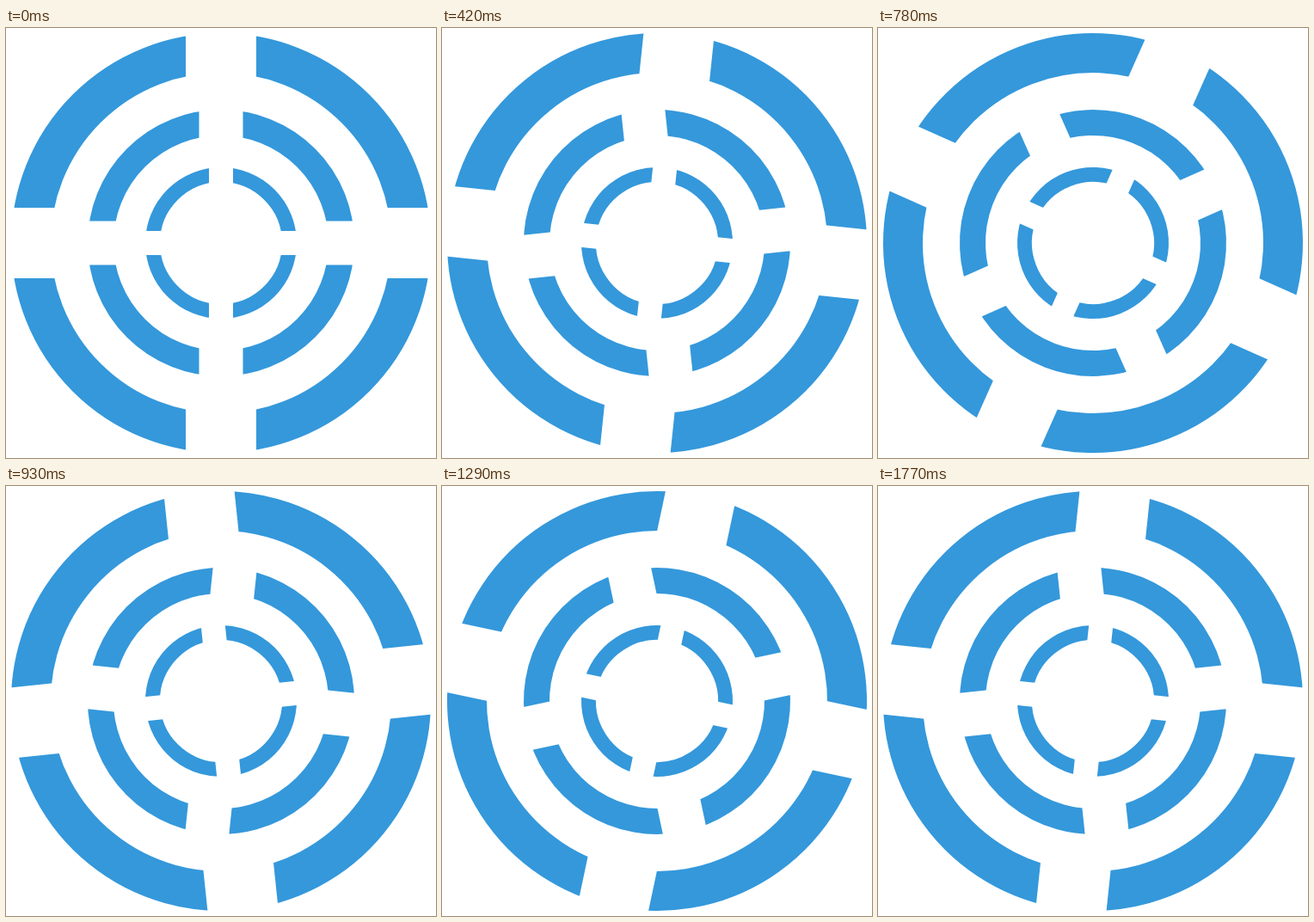
An HTML page with a canvas that plays this animation: 500x500 px, repeating every 1800 ms.

```html
<!DOCTYPE html>
<html>
<head>
<meta charset="utf-8">
<style>
  html, body { margin: 0; height: 100%; overflow: hidden; background: #fff; }
  canvas { display: block; }
</style>
</head>
<body>
<canvas width="500" height="500"></canvas>
<script>
const ctx = document.querySelector('canvas').getContext('2d');
const STEP = 30, STEPS = 60;

// Largest first: each ring's white cross is hidden only by smaller rings.
const rings = [
  { outer: 244, inner: 198, gap: 82, dir: -1 },
  { outer: 155, inner: 125, gap: 51, dir: 1 },
  { outer: 88, inner: 71, gap: 28, dir: -1 }
];

function drawRing({ outer, inner, gap, dir }, turn) {
  ctx.save();
  ctx.translate(250, 250);
  ctx.rotate(dir * turn);
  ctx.strokeStyle = '#3498db';
  ctx.lineWidth = outer - inner;
  ctx.beginPath();
  ctx.arc(0, 0, (outer + inner) / 2, 0, 2 * Math.PI);
  ctx.stroke();
  const reach = outer + 3;
  ctx.fillStyle = '#fff';
  ctx.fillRect(-gap / 2, -reach, gap, 2 * reach);
  ctx.fillRect(-reach, -gap / 2, 2 * reach, gap);
  ctx.restore();
}

const start = performance.now();

function frame() {
  const step = Math.floor((performance.now() - start) / STEP) % STEPS;
  const turn = step / STEPS * 2 * Math.PI;
  ctx.fillStyle = '#fff';
  ctx.fillRect(0, 0, 500, 500);
  for (const ring of rings) drawRing(ring, turn);
  requestAnimationFrame(frame);
}
frame();
</script>
</body>
</html>
```
